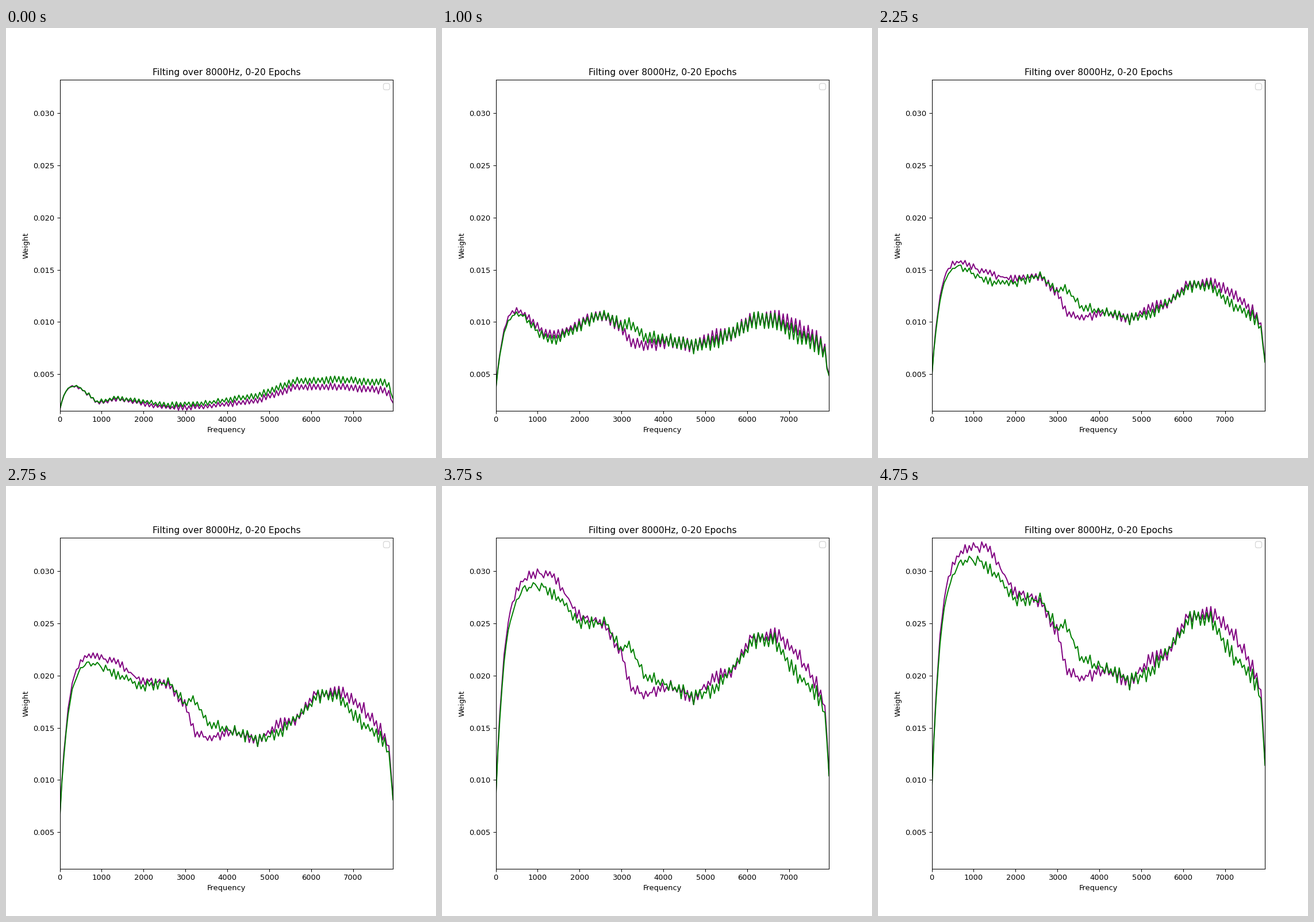
Animation of 748 by 748 pixels, one loop 5 s. Source, as a matplotlib script:

```python
import numpy as np
import matplotlib.pyplot as plt
from matplotlib.animation import FuncAnimation

EPOCHS = 20
BINS = 161
UNIT = 1e-4
k = np.arange(BINS)
freq = k * 8000 / BINS

# Both ends of the band roll off exponentially
edges = (1 - .73 * np.exp(-k / 4.2)) * (1 - .4 * np.exp((k - BINS + 1) / 1.2))

# Trained response at a few bins; the curves part between bins 52 and 84
AT = [0, 18, 28, 40, 52, 60, 65, 71, 84, 95, 104, 113, 123, 133, 143, 160]
PURPLE = np.interp(k, AT, [330, 324, 322, 279, 271, 243, 206, 196,
                           206, 191, 217, 217, 257, 260, 246, 186])
GREEN = np.interp(k, AT, [322, 315, 303, 272, 272, 245, 248, 219,
                          206, 194, 202, 221, 253, 256, 222, 186])

# Untrained response, shared by both curves
START = np.interp(k, [0, 18, 28, 52, 71, 95, 113, 133, 160],
                  [58, 23, 26, 18, 19, 25, 38, 38, 34])


def noise(seed, size):
    return np.random.default_rng(seed).uniform(-size, size, BINS)


def ripple(t):
    """Even and odd bins alternate, most strongly around epoch 4."""
    scale = .55 + .018 * t + .65 * np.exp(-((t - 4) / 1.5) ** 2)
    height = (2 + k / 40) * np.minimum(k / 18, 1)
    return scale * height * np.cos(np.pi * k)


def weights(trained, tilt, seed, t):
    level = np.interp(t, [0, 4, 7, 9, 11, 15, 19],
                      [.40, .41, .45, .53, .71, .92, 1])
    dip = max(0, .45 - .035 * t) * np.exp(-((k - 26) / 14) ** 2)
    grown = level * ((1 - dip) * trained + noise(seed, 4))
    begun = START + tilt * k / BINS
    fade = np.exp(-t / 1.3)
    body = fade * begun + (1 - fade) * grown
    return UNIT * edges * (body + ripple(t) + noise(seed + t + 1, .9))


fig, ax = plt.subplots(figsize=(8, 8), dpi=93.5)
ax.set_xlim(0, freq[-1])
ax.set_ylim(0.00151, 0.0332)
ax.set_title("Filting over 8000Hz, 0-20 Epochs")
ax.set_xlabel("Frequency")
ax.set_ylabel("Weight")
ax.legend([], [], loc="upper right")

purple, = ax.plot([], [], color="purple")
green, = ax.plot([], [], color="green")


def draw(t):
    purple.set_data(freq, weights(PURPLE, 0, 100, t))
    green.set_data(freq, weights(GREEN, 8, 200, t))
    return purple, green


anim = FuncAnimation(fig, draw, frames=EPOCHS, interval=250,
                     init_func=lambda: draw(0), repeat=True, repeat_delay=0)
plt.show()
```
